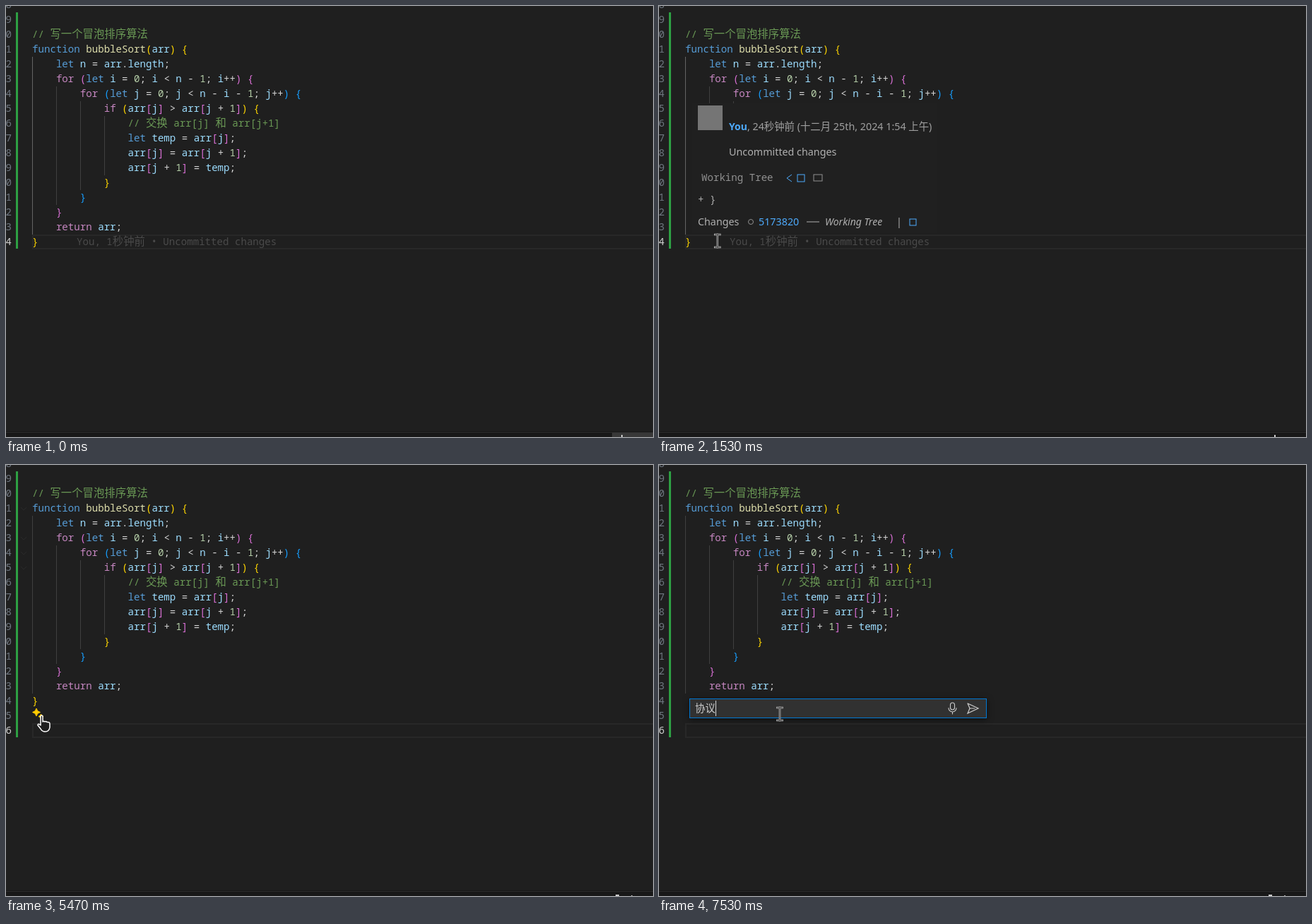
These frames come from a looping animation (916x611 px, 8000 ms). An HTML page with a canvas:

```html
<!DOCTYPE html>
<html lang="zh">
<head>
<meta charset="utf-8">
<style>
  html, body { margin: 0; width: 100%; height: 100%; overflow: hidden; background: #1f1f1f; }
  canvas { display: block; }
</style>
</head>
<body>
<canvas id="stage" width="916" height="611"></canvas>
<script>
const c = document.getElementById('stage').getContext('2d');
const LOOP = 8000, LEFT = 37, COL = 8.472, ROW = 20.96;
const BG = '#1f1f1f';
const HAN = '"Noto Sans CJK SC", "Noto Sans CJK JP", sans-serif';
const MONO = { latin: '14.12px "Noto Sans Mono", monospace', han: '300 15.4px ' + HAN };
const UI = { latin: '14.3px "Noto Sans", sans-serif', han: '14.4px ' + HAN };
const UI_BOLD = { latin: 'bold 14px "Noto Sans", sans-serif', han: UI.han };
const UI_ITALIC = { latin: 'italic 14px "Noto Sans", sans-serif', han: UI.han };

const code = [
  '// 写一个冒泡排序算法',
  'function bubbleSort(arr) {',
  '    let n = arr.length;',
  '    for (let i = 0; i < n - 1; i++) {',
  '        for (let j = 0; j < n - i - 1; j++) {',
  '            if (arr[j] > arr[j + 1]) {',
  '                // 交换 arr[j] 和 arr[j+1]',
  '                let temp = arr[j];',
  '                arr[j] = arr[j + 1];',
  '                arr[j + 1] = temp;',
  '            }',
  '        }',
  '    }',
  '    return arr;',
  '}'
];
const brackets = ['#ffd700', '#da70d6', '#179fff'];
const ghost = 'You, 1秒钟前 • Uncommitted changes';

// Row 0 is the line of the function header.
const rowTop = k => Math.round(51.2 + ROW * k);
const baseline = k => rowTop(k) + 15;
const between = (t, a, b) => t >= a && t < b;
const clamp = v => Math.max(0, Math.min(1, v));

function rect(x, y, w, h, color) {
  c.fillStyle = color;
  c.fillRect(x, y, w, h);
}

function outline(x, y, w, h, color, width = 1) {
  c.strokeStyle = color;
  c.lineWidth = width;
  c.strokeRect(x, y, w, h);
}

function line(points, color, width = 1) {
  c.beginPath();
  points.forEach(([x, y]) => c.lineTo(x, y));
  c.strokeStyle = color;
  c.lineWidth = width;
  c.stroke();
}

// Draws mixed Latin and Chinese text, returns the end position.
function write(s, x, y, color, font = MONO) {
  c.fillStyle = color;
  for (const part of s.match(/[\u4e00-\u9fff]+|[^\u4e00-\u9fff]+/g) || []) {
    c.font = part > '\u4dff' ? font.han : font.latin;
    c.fillText(part, x, y);
    x += c.measureText(part).width;
  }
  return x;
}

function tokenColor(word) {
  if (/^\/\//.test(word)) return '#6a9955';
  if (/^(for|if|return)$/.test(word)) return '#c586c0';
  if (/^(let|function)$/.test(word)) return '#569cd6';
  if (word === 'bubbleSort') return '#dcdcaa';
  if (/^\d/.test(word)) return '#b5cea8';
  return /^\w/.test(word) ? '#9cdcfe' : '#d4d4d4';
}

const tokens = [];
let depth = 0;
code.forEach((text, i) => {
  for (const m of text.matchAll(/\/\/.*|\w+|[()[\]{}]|[^\s\w()[\]{}]+/g)) {
    const word = m[0];
    let color = tokenColor(word);
    if ('([{'.includes(word)) color = brackets[depth++ % 3];
    else if (')]}'.includes(word)) color = brackets[--depth % 3];
    tokens.push({ word, color, x: LEFT + m.index * COL, row: i - 1 });
  }
});

function drawGutter(active, barRow) {
  for (let k = -3; k <= active; k++) {
    write(String((k + 11) % 10), -0.5, baseline(k), k === active ? '#d0d0d0' : '#6e7681');
  }
  rect(14, 9, 3, rowTop(barRow + 1) - 10, '#2ea043');
}

function drawGuides(scoped) {
  [[1, 12], [3, 10], [4, 9], [5, 8]].forEach(([a, b], i) => {
    const color = i === 0 && scoped ? '#646464' : '#404040';
    rect(LEFT + Math.round(i * 34), rowTop(a), 1, rowTop(b + 1) - rowTop(a), color);
  });
}

function drawChevrons(alpha) {
  c.globalAlpha = alpha;
  for (const k of [0, 2, 3, 4]) {
    const y = rowTop(k) + 9;
    line([[21, y], [25, y + 4], [29, y]], '#c5c5c5');
  }
  c.globalAlpha = 1;
}

function star(x, y, r) {
  const q = r * 0.16;
  c.beginPath();
  c.moveTo(x, y - r);
  c.quadraticCurveTo(x + q, y - q, x + r, y);
  c.quadraticCurveTo(x + q, y + q, x, y + r);
  c.quadraticCurveTo(x - q, y + q, x - r, y);
  c.quadraticCurveTo(x - q, y - q, x, y - r);
  c.fillStyle = c.strokeStyle = '#ffcc00';
  c.lineWidth = 1;
  c.fill();
  c.stroke();
}

function sparkle(x, y) {
  star(x, y, 5.5);
  star(x + 6.5, y + 6, 3.5);
}

function drawStatus(t) {
  rect(0, 603, 916, 8, '#181818');
  rect(0, 604, 916, 1, '#2b2b2b');
  if (t < 90) rect(858, 605, 58, 6, '#383838');
  if (t < 2600) rect(871, 608, 2, 3, '#cccccc');
  else {
    rect(863, 609, 5, 2, '#cccccc');
    rect(885, 610, 2, 1, '#aaaaaa');
  }
}

function drawHover(alpha) {
  c.globalAlpha = alpha;
  rect(47, 138, 347, 184, '#202020');
  rect(55, 141, 35, 35, '#757575');
  const x = write('You', 99, 176, '#4daafc', UI_BOLD);
  write(', 24秒钟前 (十二月 25th, 2024 1:54 上午)', x, 176, '#a0a0a0', UI);
  write('Uncommitted changes', 99, 212, '#b0b0b0', UI);
  write('Working Tree', 60, 248, '#909090');
  line([[188, 239], [181, 244], [188, 249]], '#4daafc');
  outline(196, 239, 10, 10, '#4daafc');
  outline(219, 239, 12, 9, '#909090');
  write('+ }', 55, 279, '#b0b0b0');
  write('Changes', 55, 311, '#b0b0b0', UI);
  c.beginPath();
  c.arc(130, 306, 3.5, 0, 7);
  c.stroke();
  write('5173820', 141, 311, '#4daafc', UI);
  line([[209, 306], [227, 306]], '#b0b0b0');
  write('Working Tree', 235, 311, '#b0b0b0', UI_ITALIC);
  write('|', 336, 311, '#b0b0b0', UI);
  outline(355, 302, 9, 9, '#4daafc');
  c.globalAlpha = 1;
}

function drawIcons(lit) {
  c.lineCap = 'round';
  c.beginPath();
  c.roundRect(412.5, 337, 6, 10, 3);
  c.strokeStyle = '#cccccc';
  c.lineWidth = 1.1;
  c.stroke();
  c.beginPath();
  c.arc(415.5, 344.5, 5.5, 0, Math.PI);
  c.moveTo(415.5, 350);
  c.lineTo(415.5, 353);
  c.stroke();
  const color = lit ? '#cccccc' : '#7c7c7c';
  line([[437, 338], [452, 345], [437, 352], [440, 345], [437, 338]], color, 1.2);
  line([[440, 345], [447, 345]], color, 1.2);
  c.lineCap = 'butt';
}

function drawPrompt(t) {
  rect(LEFT, 324, 434, 41, BG);
  c.save();
  c.shadowColor = 'rgba(0,0,0,.5)';
  c.shadowBlur = 10;
  c.shadowOffsetY = 2;
  rect(43, 331, 421, 28, '#313131');
  c.restore();
  outline(43.5, 331.5, 420, 27, '#0078d4');

  const typing = t >= 6630;
  let end = 51;
  if (!typing) write('询问 Brenfil 或键入 / 以获取命令', 51, 350, '#989898', UI);
  else {
    const text = t >= 7500 ? '协议' : t >= 6970 ? "xie'yi" : 'xie';
    end = write(text, 51, 350, '#cccccc', UI);
    if (t < 7500) rect(51, 353, end - 51, 1, '#aaaaaa');
  }
  drawIcons(typing);
  if (!between(t, 5970, 6500)) rect(Math.round(end), 334, 1, 22, '#d4d4d4');
}

function drawCandidates(t) {
  c.save();
  c.shadowColor = 'rgba(0,0,0,.4)';
  c.shadowBlur = 6;
  c.beginPath();
  c.roundRect(84, 371, 456, 48, 7);
  c.fillStyle = '#2c2c2c';
  c.fill();
  c.restore();
  const words = t < 6970 ? '写 些 谢 鞋 协 斜 歇' : '协议 写一 谢意 鞋业 写意';
  let x = 100;
  words.split(' ').forEach((w, i) => {
    x = write(i + 1 + '  ', x, 400, '#9a9a9a', UI);
    x = write(w, x, 400, '#f0f0f0', UI) + 20;
  });
}

const path = [
  [30, 900, 624], [300, 600, 480], [600, 240, 370], [830, 109, 339], [930, 83, 333],
  [1530, 83, 333], [1680, 48, 333], [2040, 48, 333], [2170, 201, 355],
  [4640, 201, 355], [4950, 40, 364], [5150, 16, 366], [5300, 20, 362], [5470, 49, 355],
  [5700, 52, 355], [5820, 100, 370], [5970, 171, 353]
];

function pointer(t) {
  const i = path.findIndex(p => p[0] > t);
  if (i < 0) return path[path.length - 1].slice(1);
  if (i === 0) return path[0].slice(1);
  const [a, b] = [path[i - 1], path[i]];
  const f = (t - a[0]) / (b[0] - a[0]);
  return [a[1] + (b[1] - a[1]) * f, a[2] + (b[2] - a[2]) * f];
}

function drawBeam(x, y) {
  const stroke = (color, w) => {
    line([[x - 3.5, y - 9], [x + 3.5, y - 9]], color, w);
    line([[x - 3.5, y + 9], [x + 3.5, y + 9]], color, w);
    line([[x, y - 9], [x, y + 9]], color, w);
  };
  c.lineCap = 'square';
  stroke('#b8b8b8', 2.6);
  stroke('#222222', 0.9);
  c.lineCap = 'butt';
}

function drawShape(x, y, d) {
  c.save();
  c.translate(x, y);
  const p = new Path2D(d);
  c.fillStyle = BG;
  c.strokeStyle = '#ffffff';
  c.lineWidth = 1.5;
  c.lineJoin = 'round';
  c.fill(p);
  c.stroke(p);
  c.restore();
}

const HAND = 'M0 2Q0 0 1.5 0T3 2V9Q4.5 7.5 6 9Q7.5 8 9 9.5Q13 9 13 12V17Q12 23 6.5 23Q2 23 0 19' +
  'L-4 14Q-4 11.5-2 12.5L0 14Z';
const ARROW = 'M0 0V15L3.5 12L6 17L8 16L6 11H10Z';

function drawPointer(t) {
  const [x, y] = pointer(t);
  if (between(t, 5400, 5500)) drawShape(x, y, HAND);
  else if (x < 34) drawShape(x, y, ARROW);
  else drawBeam(x, y);
}

function draw(t) {
  const active = t < 2370 ? 13 : t < 3630 ? 14 : 15;
  rect(0, 0, 916, 611, BG);
  outline(LEFT + 1, rowTop(active) + 1, 900, 19, '#282828', 2);
  drawGutter(active, t < 2700 ? 13 : active);
  drawGuides(active === 13);
  if (between(t, 4900, 5530)) {
    drawChevrons(t < 5150 ? clamp((t - 4900) / 200) * 0.7 : 0.07 + 0.6 * clamp((5450 - t) / 200));
  }

  if (between(t, 1700, 2400)) {
    for (const [x, k] of [[LEFT + 25 * COL, 0], [LEFT, 13]]) {
      const left = Math.floor(x) + 0.5;
      rect(left, rowTop(k), 8, 20, 'rgba(0,100,0,.1)');
      outline(left, rowTop(k) + 0.5, 8, 20, '#888888');
    }
  }
  for (const k of tokens) write(k.word, k.x, baseline(k.row), k.color);

  if (t < 2600) write(ghost, t < 2370 ? 100 : 91.5, baseline(active), '#4a4a4a');
  if (between(t, 3130, 4430)) sparkle(52, 330.5);
  if (between(t, 4430, 5500)) sparkle(43, 350.5);

  const caret = between(t, 1700, 2170) || between(t, 2370, 2870) ||
    between(t, 3400, 4130) || between(t, 4670, 5170);
  if (caret) rect(active === 13 ? 45 : LEFT, rowTop(active), 2, 21, '#cfcfcf');

  if (between(t, 1130, 1570)) drawHover(clamp(0.2 + (t - 1130) / 125));
  drawStatus(t);
  if (t >= 5500) drawPrompt(t);
  if (between(t, 6630, 7500)) drawCandidates(t);
  drawPointer(t);
}

function tick() {
  draw(performance.now() % LOOP);
  requestAnimationFrame(tick);
}
tick();
</script>
</body>
</html>
```
